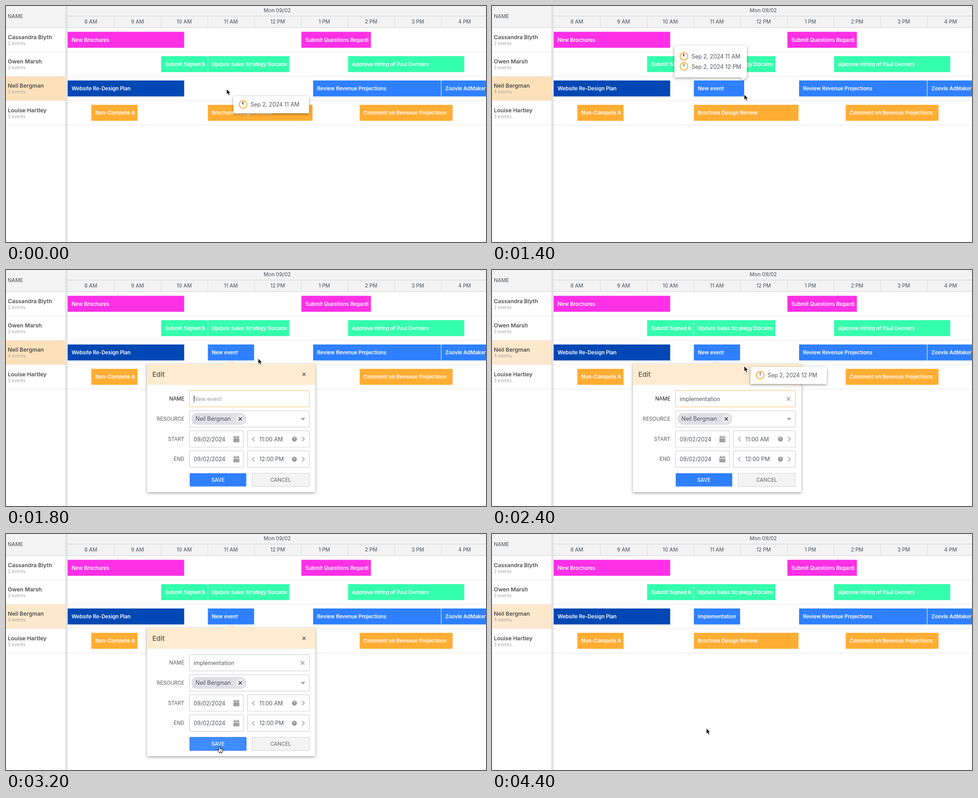
These frames come from a looping animation (1066x526 px, 4.6 s). An HTML page:

```html
<!DOCTYPE html>
<html lang="en">
<head>
<meta charset="utf-8">
<title>Scheduler</title>
<style>
  html, body { margin: 0; width: 100%; height: 100%; overflow: hidden; background: #fff; }
  svg { display: block; width: 1066px; height: 526px; font-family: Inter, "Open Sans", sans-serif; }
  text { white-space: pre; }
  .head { font-size: 11.4px; font-weight: 500; fill: #606770; }
  .name { font-size: 12.4px; font-weight: 600; fill: #4d4f52; }
  .count { font-size: 9.85px; fill: #a5a5a5; }
  .event { font-size: 11.3px; font-weight: 600; fill: #fff; }
  .body { font-size: 12.4px; fill: #4f5560; }
  .hint { font-size: 12.4px; fill: #999; }
  .label { font-size: 11.4px; fill: #55585c; text-anchor: end; }
  .title { font-size: 15.1px; font-weight: 500; fill: #55524c; }
  .button { font-size: 11.4px; font-weight: 500; text-anchor: middle; }
  .mid { text-anchor: middle; }
  .float { filter: drop-shadow(0 2px 3px rgba(0, 0, 0, .38)); }
  .field { fill: #fff; stroke: #cfcfcf; stroke-width: 1.2; }
  .line { fill: none; stroke-width: 1.5; }
</style>
</head>
<body>
<svg id="stage" viewBox="0 0 1066 526"></svg>
<script>
const LOOP = 4600;
const ROW = 54.25, TOP = 48.2, HOUR = 103.75, LEFT = 137;
const PINK = '#ff30e6', GREEN = '#34ffac', NAVY = '#0048b4', BLUE = '#2f80ff', ORANGE = '#ffad33';
const OWNER = 'Neil Bergman';

const people = [['Cassandra Blyth', 2], ['Owen Marsh', 3], [OWNER, 3], ['Louise Hartley', 3]];
const hours = ['8 AM', '9 AM', '10 AM', '11 AM', '12 PM', '1 PM', '2 PM', '3 PM', '4 PM'];

// row, left, right, colour, title
const events = [
  [0, 137, 395.7, PINK, 'New Brochures'],
  [0, 656, 810.3, PINK, 'Submit Questions Regarding'],
  [1, 344.5, 447.6, GREEN, 'Submit Signed NDA'],
  [1, 448.4, 629, GREEN, 'Update Sales Strategy Document'],
  [1, 759.7, 1017.7, GREEN, 'Approve Hiring of Paul Denvers'],
  [2, 137, 395.7, NAVY, 'Website Re-Design Plan'],
  [2, 682, 966, BLUE, 'Review Revenue Projections'],
  [2, 967, 1071, BLUE, 'Zoovle AdMakers'],
  [3, 189.5, 292, ORANGE, 'Non-Compete Agreements'],
  [3, 448.3, 680.7, ORANGE, 'Brochure Design Review'],
  [3, 785.5, 991.7, ORANGE, 'Comment on Revenue Projections']
];

// Each step keeps the values of the one before unless it changes them.
const steps = [
  { at: 0, x: 490, y: 185, hand: false, tip: [505, 201, 11], drag: false, end: 0, title: 'New event',
    dialog: false, typed: '', focus: true, hover: false, cell: '#fee1b9' },
  { at: 1000, tip: null },
  { at: 1200, x: 525, y: 190, drag: true, end: 525 },
  { at: 1400, x: 560, y: 197, end: 560 },
  { at: 1600, drag: false, end: 551, dialog: true },
  { at: 2200, typed: 'impleme' },
  { at: 2400, typed: 'implementation', y: 214, tip: [574, 216, 12], cell: '#fee8cb' },
  { at: 2600, x: 540, y: 330, tip: null },
  { at: 2800, x: 486, y: 462, hand: true, hover: true },
  { at: 3000, x: 474, y: 473 },
  { at: 3200, focus: false },
  { at: 3400, x: 475, y: 454, hand: false, dialog: false, title: 'implementation' },
  { at: 3600, x: 476, y: 433 }
];
steps.forEach((step, i) => { if (i) steps[i] = { ...steps[i - 1], ...step }; });

const text = (x, y, cls, value, extra = '') => `<text x="${x}" y="${y}" class="${cls}" ${extra}>${value}</text>`;
const rect = (x, y, w, h, fill, extra = '') =>
  `<rect x="${x}" y="${y}" width="${w}" height="${h}" fill="${fill}" ${extra}/>`;
const path = (d, fill, extra = '') => `<path d="${d}" fill="${fill}" ${extra}/>`;
const stroke = (d, color, extra = '') => `<path class="line" d="${d}" stroke="${color}" ${extra}/>`;
const group = (id, content, extra = '') => `<g id="${id}" ${extra}>${content}</g>`;
const cross = (x, y, r, color) => stroke(`M${x - r} ${y - r}l${2 * r} ${2 * r}m0 ${-2 * r}l${-2 * r} ${2 * r}`, color);
const field = (x, y, w, id = '') => rect(x, y, w, 36.6, '#fff', `class="field" rx="1" ${id && `id="${id}"`}`);

function bar([row, left, right, color, title], i) {
  const y = TOP + row * ROW + 9.3, w = right - left;
  return `<clipPath id="clip${i}">${rect(left, y, w - 5.5, 36, '#fff')}</clipPath>` +
    rect(left, y, w, 35.6, color) +
    `<g clip-path="url(#clip${i})">${text(left + 8.8, y + 22.1, 'event', title)}</g>`;
}

function clock(x, y, hour) {
  const hand = hour === 11 ? 'M0 0L-2.2 -4.2M0 0V-5.6' : 'M0 0V-5.8';
  return `<g transform="translate(${x} ${y})"><circle r="8.5" fill="#fff" stroke="#f5a935" stroke-width="2"/>` +
    stroke(hand, '#4a4f58', 'stroke-linecap="round"') + '</g>';
}

function grid() {
  let out = rect(0, 0, 1066, TOP, '#f3f3f3') + stroke(`M0 ${TOP}H1066M137 22.5H1066`, '#dcdcdc', 'stroke-width="1"');
  out += text(4, 26.8, 'head', 'NAME') + text(602.5, 14, 'head mid', 'Mon 09/02');
  hours.forEach((label, i) => {
    const x = LEFT + i * HOUR;
    out += text(x + HOUR / 2 - .6, 39.2, 'head mid', label);
    if (i) out += rect(x - .5, 23, 1, 25, '#dadada');
  });
  people.forEach(([person, count], i) => {
    const y = TOP + i * ROW;
    if (person === OWNER) out += rect(0, y + .5, 132, ROW - 1, '#fff', 'id="cell"');
    out += rect(0, y + ROW - .5, 1066, 1, '#e4e4e4') + text(4, y + 25.7, 'name', person) +
      text(4, y + 38.7, 'count', `${count} events`, `id="count${i}"`);
  });
  return out + rect(131.5, 0, 5.5, 526, '#e3e3e5');
}

function dateTime(y, time) {
  const mid = y + 18.5;
  return field(407.6, y, 119.8) + text(416.8, mid + 4.6, 'body', '09/02/2024') +
    path(`M505 ${mid - 5.5}h13.2v3h-13.2zm0 4.2h13.2v8.3h-13.2zM507.2 ${mid - 8}h2v3h-2zm6.8 0h2v3h-2z`, '#a0a0a0') +
    field(536, y, 137.6) + text(562.5, mid + 4.6, 'body', time) +
    stroke(`M552 ${mid - 5}l-5 5l5 5M657.5 ${mid - 5}l5 5l-5 5`, '#999') +
    `<circle cx="640.5" cy="${mid}" r="5.6" fill="#9b9b9b"/>` + stroke(`M640.5 ${mid + .5}v-4`, '#fff');
}

function dialog() {
  const labels = ['NAME', 'RESOURCE', 'START', 'END'];
  return `<g class="float">${rect(313, 209, 374, 286, '#fff', 'rx="1"')}${path('M491 210l9 -7l9 7z', '#fdebd0')}</g>` +
    rect(313, 209, 374, 47, '#feebd0') + text(325, 237.6, 'title', 'Edit') + cross(662, 232.6, 3.2, '#4f4f4f') +
    labels.map((label, i) => text(396, 291 + i * 44.8, 'label', label, `id="label${i}"`)).join('') +
    field(407.6, 268.6, 266, 'nameField') + text(416.8, 291.6, 'hint', 'New event', 'id="hint"') +
    rect(417, 279, 1, 16.5, '#333', 'id="caret"') + text(416.8, 291.6, 'body', '', 'id="typed"') +
    group('clear', cross(658.6, 287.2, 4.2, '#999')) +
    field(407.6, 313.6, 266) + rect(411.5, 318.6, 122, 26.4, '#dfdfe3', 'rx="13.2"') +
    '<circle cx="520.3" cy="331.8" r="9.5" fill="#ebebee"/>' +
    text(420.8, 336.4, 'body', OWNER) + cross(520.3, 331.8, 3.6, '#333') +
    path('M654.5 329.8h10.4l-5.2 5.4z', '#a0a0a0') +
    dateTime(358.4, '11:00 AM') + dateTime(403.2, '12:00 PM') +
    rect(408, 453, 125.6, 29.6, BLUE, 'id="save" rx="1"') + text(470.8, 471.8, 'button', 'SAVE', 'fill="#fff"') +
    rect(546.5, 453, 127, 29.3, '#f3f3f3', 'stroke="#cfcfcf"') + text(610, 471.8, 'button', 'CANCEL', 'fill="#777"');
}

const dragTip =
  `<g class="float">${rect(-155, 0, 161, 71, '#fff', 'rx="1"')}${path('M-10 70h16l-8 7z', '#fff')}</g>` +
  clock(-133.8, 24.2, 11) + text(-117, 29, 'body', 'Sep 2, 2024 11 AM') +
  clock(-133.8, 46.6, 12) + text(-117, 51.6, 'body', 'Sep 2, 2024 12 PM');

const hoverTip = hour => rect(0, 0, hour === 11 ? 168 : 169.5, 38, '#fff', 'class="float" rx="1"') +
  clock(21.6, 18.4, hour) + text(38, 23, 'body', `Sep 2, 2024 ${hour === 11 ? '11 AM' : '12 PM'}`);

const arrow = path('M0 0V12.4L2.8 9.8L4.8 14.6L7.1 13.6L5.1 9H8.8Z', '#000', 'stroke="#fff" stroke-width="1" class="shape"');
const hand = path('M-1.3 1.2Q0 -.8 1.4 1V6Q2.5 4.9 3.5 6.2Q4.7 5.4 5.5 6.8Q7.2 6.2 7.5 8.4Q7.6 11 6 12.4V14.6H-.4V13L-4.3 8.6Q-4.2 6.7 -1.3 8.4Z',
  '#fff', 'stroke="#111" stroke-width="1.1" stroke-linejoin="round"') + stroke('M1.6 9.5v3M3.7 9.5v3', '#111', 'style="stroke-width:.8"');

const stage = document.getElementById('stage');
stage.innerHTML = grid() + events.map(bar).join('') +
  group('fresh', rect(448.3, TOP + 2 * ROW + 9.3, 0, 35.6, BLUE, 'id="freshBar"') +
    text(457, TOP + 2 * ROW + 31.4, 'event', '', 'id="freshTitle"')) +
  group('dialog', dialog()) + group('dragTip', dragTip) +
  group('tip11', hoverTip(11)) + group('tip12', hoverTip(12)) +
  group('arrow', arrow) + group('hand', hand);

const el = {};
stage.querySelectorAll('[id]').forEach(node => { el[node.id] = node; });
const show = (node, on) => { node.style.display = on ? '' : 'none'; };
const move = (node, x, y) => node.setAttribute('transform', `translate(${x} ${y})`);

function render(s) {
  show(el.arrow, !s.hand);
  show(el.hand, s.hand);
  move(s.hand ? el.hand : el.arrow, s.x, s.y);

  for (const hour of [11, 12]) {
    const on = s.tip && s.tip[2] === hour;
    show(el['tip' + hour], on);
    if (on) move(el['tip' + hour], s.tip[0], s.tip[1]);
  }
  show(el.dragTip, s.drag);
  move(el.dragTip, s.end, 88);

  show(el.fresh, s.end > 0);
  el.freshBar.setAttribute('width', Math.max(0, s.end - 448.3));
  el.freshTitle.textContent = s.title;
  el.count2.textContent = s.end ? '4 events' : '3 events';
  el.cell.style.fill = s.cell;

  show(el.dialog, s.dialog);
  el.typed.textContent = s.typed;
  show(el.hint, !s.typed);
  show(el.caret, !s.typed);
  show(el.clear, s.typed);
  el.nameField.style.stroke = s.focus ? '#f7c778' : '';
  el.label0.style.fill = s.focus ? '#111' : '';
  el.save.style.fill = s.hover ? '#3f8cff' : '';
  el.save.style.stroke = s.hover ? '#2f75dd' : 'none';
}

let current;
function tick() {
  const t = performance.now() % LOOP;
  const step = steps.filter(s => s.at <= t).pop();
  if (step !== current) render(current = step);
  requestAnimationFrame(tick);
}
tick();
</script>
</body>
</html>
```
